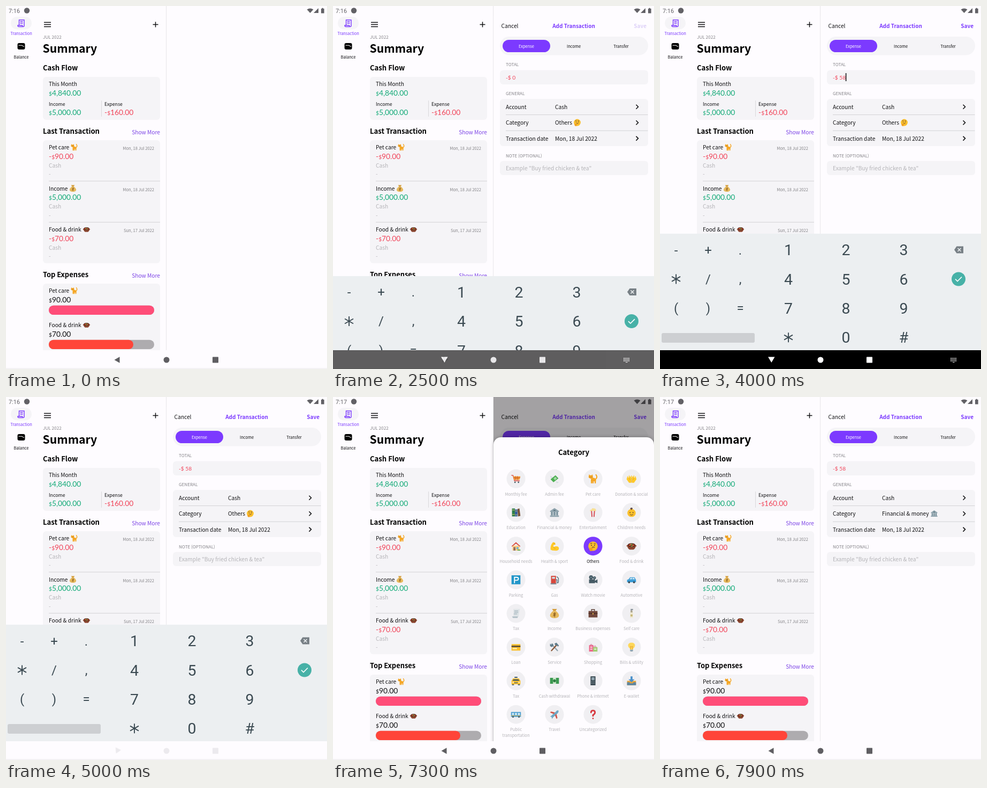
Recreate the animation shown at these times as an HTML page. Size 600 px wide and 676 px high, loop 8 s.

```html
<!DOCTYPE html>
<html lang="en">
<head>
<meta charset="utf-8">
<title>Budget app: add a transaction</title>
<style>
html, body { margin: 0; width: 100%; height: 100%; overflow: hidden; background: #fefcff; }
svg { display: block; }
#stage { width: 600px; height: 676px; }
text { font-family: "Noto Sans CJK SC", "Noto Sans CJK JP", "Noto Sans CJK", "Noto Sans", sans-serif; white-space: pre; }
.lato { font-family: Lato, sans-serif; }
.roboto { font-family: Roboto, sans-serif; }
.raised { filter: drop-shadow(0 0 3px rgba(0,0,0,.28)); }

[class^="a-"] { animation: 8s linear infinite; }
.a-panel { animation-name: panel; }
.a-keys { animation-name: keys; }
.a-dark { animation-name: dark; }
.a-light { animation-name: light; }
.a-turn { animation-name: turn; transform-origin: 208px 659px; }
.a-press { animation-name: press; }
.a-dim { animation-name: dim; }
.a-sheet { animation-name: sheet; }
.a-early, .a-late, .a-old, .a-new, .a-zero, .a-five, .a-full, .a-off, .a-on, .a-caret { animation-timing-function: step-end; }
.a-early { animation-name: early; }
.a-late { animation-name: late; }
.a-old { animation-name: old; }
.a-new { animation-name: new; }
.a-zero, .a-off { animation-name: zero; }
.a-five { animation-name: five; }
.a-full { animation-name: full; }
.a-on { animation-name: on; }
.a-caret { animation-name: caret; }

@keyframes panel {
  0%, 25.6% { transform: translateY(676px); animation-timing-function: cubic-bezier(.2,.7,.2,1); }
  29.4%, 100% { transform: none; }
}
@keyframes keys {
  0%, 29.4% { transform: translateY(252px); animation-timing-function: ease-out; }
  33.1%, 62.6% { transform: none; animation-timing-function: ease-in; }
  66%, 100% { transform: translateY(252px); }
}
@keyframes dark { 0%, 30% { opacity: 0 } 32%, 61% { opacity: 1 } 62.4%, 100% { opacity: 0 } }
@keyframes light { 0%, 30% { opacity: 1 } 32%, 62.2% { opacity: 0 } 65%, 100% { opacity: 1 } }
@keyframes turn {
  0%, 30% { transform: none }
  32%, 61.5% { transform: rotate(-90deg) }
  65%, 100% { transform: none }
}
@keyframes press { 0%, 74.8% { opacity: 0 } 75.8%, 78% { opacity: 1 } 80%, 100% { opacity: 0 } }
@keyframes dim { 0%, 77.2% { opacity: 0 } 79%, 95% { opacity: 1 } 97.5%, 100% { opacity: 0 } }
@keyframes sheet {
  0%, 77.2% { transform: translateY(612px); animation-timing-function: cubic-bezier(.2,.7,.2,1); }
  80.8%, 95% { transform: none; animation-timing-function: ease-in; }
  97.8%, 100% { transform: translateY(612px); }
}
@keyframes early { 0% { opacity: 1 } 85%, 100% { opacity: 0 } }
@keyframes late { 0% { opacity: 0 } 85%, 100% { opacity: 1 } }
@keyframes old { 0% { opacity: 1 } 93.75%, 100% { opacity: 0 } }
@keyframes new { 0% { opacity: 0 } 93.75%, 100% { opacity: 1 } }
@keyframes zero { 0% { opacity: 1 } 41.25%, 100% { opacity: 0 } }
@keyframes on { 0% { opacity: 0 } 41.25%, 100% { opacity: 1 } }
@keyframes five { 0% { opacity: 0 } 41.25% { opacity: 1 } 48.75%, 100% { opacity: 0 } }
@keyframes full { 0% { opacity: 0 } 48.75%, 100% { opacity: 1 } }
@keyframes caret {
  0% { opacity: 0 }
  32.5% { opacity: 1 }
  40% { opacity: 0 }
  41.25% { opacity: 1; transform: none }
  47.5% { opacity: 0; transform: none }
  48.75% { opacity: 1; transform: translateX(6.5px) }
  55%, 100% { opacity: 0; transform: translateX(6.5px) }
}
</style>
</head>
<body>
<svg id="stage" viewBox="0 0 600 676"></svg>
<script>
const ink = '#111113', paper = '#fefcff', card = '#f5f4f7', purple = '#7c3aff', link = '#7d45e6';
const green = '#12aa77', red = '#f1455a', gray = '#858488', pale = '#b5b4b8', key = '#3b4a52';

const text = (x, y, s, size = 10.2, fill = ink, more = '') =>
  `<text x="${x}" y="${y}" font-size="${size}" fill="${fill}" ${more}>${s}</text>`;
const bold = 'font-weight="700"', mid = 'text-anchor="middle"', end = 'text-anchor="end"';
const rect = (x, y, w, h, fill, r = 0) =>
  `<rect x="${x}" y="${y}" width="${w}" height="${h}" rx="${r}" fill="${fill}"/>`;
const line = (d, stroke, w = 1) => `<path d="${d}" fill="none" stroke="${stroke}" stroke-width="${w}"/>`;
const shape = (d, fill) => `<path d="${d}" fill="${fill}"/>`;
const disc = (x, y, r, fill) => `<circle cx="${x}" cy="${y}" r="${r}" fill="${fill}"/>`;
const anim = (name, s) => `<g class="a-${name}">${s}</g>`;
const money = (x, y, n, fill, sign = '') =>
  text(x, y, `${sign}<tspan font-size="10.2">$</tspan>${n}`, 13.8, fill, 'class="lato"');

// Pictograms on a 20 x 20 grid: "color path" is filled, "~color width path" is stroked.
const art = {
  cat: '~#f5a623 2.2 M15 11q5-4 1-9|~#f5a623 2.6 M7 12v6M10 13v5M14.5 12v6|#f5a623 M6 8h6q4 1 4 7H6zM1 7l1-6 2 2h3l2-2 1 6q-3 5-8 1z|~#5d4037 1 M4 6.5v.1M7.5 6.5v.1',
  bag: '#e6b95c M7 5h6q6 5 6 9 0 5.5-9 5.5t-9-5.5q0-4 6-9|#d39a35 M5 1h10l-3 4H8z|~#8a5c20 1.3 M12.5 10q-5-1-4 1.5t3 1.5-4 2M10.5 8v9',
  pot: '~#a4533a 3 M1.5 9.5h17|#8b4630 M2 9h16q1 5-4 8H6q-5-3-4-8|#5a2d22 M2 8.5a8 4.5 0 0 1 16 0a8 3.5 0 0 1-16 0|~#e9542f 2.2 M5.5 8h2M13 8h1.5|~#7fb04d 2 M10 6.5h1M9.5 10h.5|~#f0b45c 1.6 M8 6.3h.3M12 9.7h.3',
  think: '#fbc02d M10 .5a9.5 9.5 0 0 1 0 19a9.5 9.5 0 0 1 0-19|~#5d4037 2 M7 8v.5M13 8v.5|~#5d4037 1.1 M5 5l3-1M12 4.500l3 1M8 12.500q3-1.500 5 0|#ef9f20 M3 12l2 2 6-1 .5 1.500-3 1q1 4-2 4.500-4 0-4-4z',
  bank: '#90a4ae M1 7l9-6 9 6v2H1zM1 16h18v3H1z|#b9c6cc M3 9h14v7H3z|#78909c M3 9h3v7H3zM8.500 9h3v7h-3zM14 9h3v7h-3z|#546e7a M8 5h4v2H8z',
  cart: '~#d84b3e 1.5 M1 3h3l3 11h10|#f29b38 M4 5h15l-2 7H6z|~#c95a2f 1 M9 5v7M13 5v7M5 8h13|~#455a64 3 M8 17h.1M15 17h.1',
  cash: '#4caf50 M2 11l10-8 6 6-10 8z|#a5d6a7 M8 9l4-3 3 3-4 4z|#d5dce0 M1 4l6 3-4 2zM12 15l7 2-4 2z',
  hands: '#ffc928 M9.500 18H5L0 11l2-7 2 5 1-7 2 5 2.500-4zM10.500 18H15l5-7-2-7-2 5-1-7-2 5-2.500-4z|~#dc9a10 .8 M10 8v9M5 9l2 3M15 9l-2 3',
  books: '#2e7d4b M2 2h6v16H2z|#335c9e M8 4h5v14H8z|#76533a M13 3l4-1 2 15-5 1z|~#e8cf62 1 M3 5h4M9 7h3M3 14h4M9 15h3',
  snack: '#f7df94 M4 8q-1-4 3-4 1-4 5-2 5 0 4 6z|#eceff1 M4 7h12l-2 12H6z|#d9434a M6 7h2l1 12H7zM12 7h2l-1 12h-2z',
  child: '#fbc02d M10 3a8.500 8 0 0 1 0 16a8.500 8 0 0 1 0-16|~#543930 1.5 M10 4q-4-2 0-3 3 1 0 2|~#543930 1.8 M7 10v.5M13 10v.5|~#543930 1 M7 14q3 3 6 0',
  house: '#ffcc80 M3 9h14v10H3z|#d84b3e M1 10l9-8 9 8-1 1-8-6-8 6z|#8d6e63 M5 12h4v7H5z|#64b5d6 M11 12h4v4h-4z|#65a843 M13 17h6v2h-6z',
  arm: '#ffc928 M2 17q-1-8 5-15l4 1 1 4-4 1v4q9-4 11 2 0 6-9 5-5 0-8-2|~#dc9a10 .8 M8 12q1 3 4 3M8 5h3',
  park: '#2196c9 M1 1h18v18H1z|~#fff 2 M7 16V5h4q4 0 4 3t-4 3H7',
  fuel: '#d8473c M3 2h10v17H3z|#cfd8dc M5 4h6v4H5z|~#546e7a 1.5 M13 10h2v6q3 1 3-2V7l-3-3|#78909c M2 17h12v2H2z',
  film: '#455a64 M2 9h12v8H2zM14 12l5-3v8l-5-2zM6 1a4 4 0 0 1 0 8a4 4 0 0 1 0-8M13 3a3 3 0 0 1 0 6a3 3 0 0 1 0-6|#90a4ae M5 4h2v2H5zM12 5h2v2h-2z',
  car: '#3a9bd5 M1 10l3-1 3-4h9l3 5v5H1z|#cfe8f5 M6 9l2-3h3v3zM12 6h3l2 3h-5z|~#37474f 4 M5 15h.1M15 15h.1',
  bill: '#dfe4e7 M5 1h13l-3 16H2l3-2z|~#90a4ae 1 M7 5h7M7 8h7M6 11h6|#b0bec5 M2 16h12l-1 3H4z',
  case: '~#5d4037 1.5 M7 5V2h6v3|#70483c M1 5h18v13H1z|#503229 M1 9h18v2H1z|#e0b04c M9 9h2v3H9z',
  bottle: '#efe8d2 M7 8h6v11H7z|#b0a88d M8 4h4v4H8z|#7d8790 M8 1h5v2h-3v2H9z|#c6b778 M8 12h4v4H8z',
  credit: '#fbc02d M1 4h18v13H1z|#5d5038 M1 7h18v3H1z|#fff3d0 M3 12h9v2H3z',
  tools: '~#90a4ae 2.5 M4 4l12 13|~#8d5a3b 2.5 M4 17L14 6|#607d8b M10 3l4-2 5 6-2 2-3-3-2 1zM1 3l3 3 2-4 2 4-3 4-4-2z',
  shop: '~#c74b72 1 M4 7q2-6 5 0M12 10q2-6 4 0|#ec6b8e M2 6h9v13H2z|#a3cd75 M10 10h9v9h-9z|~#fff 1.5 M5 10h3M5 14h3M13 14h3',
  bulb: '#fdd75a M10 1q7 0 7 6 0 3-4 6v2H7v-2q-4-3-4-6 0-6 7-6|#90a4ae M7 15h6v3l-2 1H9l-2-1z|~#e99b22 1 M8 14V8l2 2 2-2v6',
  taxi: '#fbc02d M1 10l3-5h12l3 5v7H1z|#455a64 M5 7h10l2 3H3zM7 2h6v2H7zM2 17h4v2H2zM14 17h4v2h-4z|~#fff 2 M4 13h.5M16 13h.5|~#546e7a 1.5 M7 14h6',
  note: '#3b9950 M1 4h18v12H1z|#cde8c9 M7 4h6v12H7z|#2f7d43 M10 7a3 3 0 0 1 0 6a3 3 0 0 1 0-6',
  phone: '#37474f M5 1h10v18H5z|#90a4ae M7 3h6v6H7z|~#b0bec5 1.2 M7 12h.5M10 12h.5M13 12h.1M7 15h.5M10 15h.5M13 15h.1',
  inbox: '#e2a23b M1 10h18v9H1z|#4a90c9 M8 1h4v6h4l-6 6-6-6h4z|#5c86a3 M1 13h5l1 2h6l1-2h5v6H1z',
  bus: '#4c9ed1 M0 5h20v10H0z|#d9eef7 M2 7h4v4H2zM8 7h4v4H8zM14 7h4v4h-4z|~#37474f 3 M4 15h.1M16 15h.1|#e5b84c M0 12h20v1H0z',
  plane: '#6fa7c4 M18 2q-3-1-5 2L3 13l-2 1 3 1 1 4 2-3L17 7q2-3 1-5|#d15447 M11 6L3 4 1 6l7 3zM14 9l2 8-2 2-3-7z',
  ask: '~#d7373f 3 M6 6q0-4 4-4t4 4q0 3-4 5v2M10 18v.1'
};
const icon = (name, x, y, size = 13.5) =>
  `<g transform="translate(${x - size / 2} ${y - size / 2}) scale(${size / 20})" stroke-linecap="round">` +
  art[name].split('|').map(part => {
    const p = part.split(' ');
    if (part[0] !== '~') return shape(p.slice(1).join(' '), p[0]);
    return line(p.slice(2).join(' '), p[0].slice(1), p[1]);
  }).join('') + '</g>';

function rail() {
  return rect(9, 20, 39, 23.5, card, 11.7) +
    line('M24.500 36V26h9.500v10.500q0 2-2 2H24q-2 0-2-2V36h8.500v1q0 1.500 1.500 1.500M26.500 29h5M26.500 32h5', purple, 1.4) +
    text(28.5, 54, 'Transaction', 7.45, purple, mid) +
    rect(21.5, 69, 14, 12, '#000', 3) +
    line('M23.500 73.300h6.500q1.500 2.200 4 2.200', '#fff', 1.1) +
    text(28.5, 97.5, 'Balance', 7.5, ink, mid);
}

function transaction(y, name, pic, picX, date, n, fill, sign) {
  return text(80, y + 17, name) + icon(pic, picX, y + 13) +
    text(277, y + 18, date, 7.6, gray, end) + money(80, y + 34.5, n, fill, sign) +
    text(80, y + 50.5, 'Cash', 10.2, pale) + text(80, y + 66, '-', 10.2, pale);
}

function expense(y, name, pic, picX, n, fill, w) {
  return text(80, y, name) + icon(pic, picX, y - 4) + money(80, y + 17.5, n, ink) +
    rect(80, y + 23.8, 197, 17.3, '#aeacaf', 8.6) + rect(80, y + 23.8, w, 17.3, fill, 8.6);
}

function summary() {
  const more = y => text(288, y, 'Show More', 10.2, link, end);
  return line('M71 30.500h13M71 34.500h13M71 38.500h13', ink, 1.5) +
    line('M274.500 34.500h10M279.500 29.500v10', ink, 1.5) +
    text(69, 61, 'JUL 2022', 8.2, gray) + text(68.5, 87, 'Summary', 21.2, '#000', bold) +
    text(69, 120, 'Cash Flow', 13.1, '#000', bold) + rect(69, 132, 219, 80, card, 6) +
    text(80, 149, 'This Month') + money(80, 167, '4,840.00', green) +
    text(80, 186, 'Income', 8.8) + money(80, 203, '5,000.00', green) +
    line('M178.500 176v30', '#d9d8db') +
    text(184, 186, 'Expense', 8.8) + money(184, 203, '160.00', red, '-') +
    text(69, 238, 'Last Transaction', 13.1, '#000', bold) + more(239.2) +
    rect(69, 250, 219, 229, card, 6) +
    transaction(250, 'Pet care', 'cat', 127.5, 'Mon, 18 Jul 2022', '90.00', red, '-') +
    transaction(326.5, 'Income', 'bag', 125, 'Mon, 18 Jul 2022', '5,000.00', green) +
    transaction(403, 'Food &amp; drink', 'pot', 150.5, 'Sun, 17 Jul 2022', '70.00', red, '-') +
    line('M80 326h208M80 402.700h208', '#d3d2d5') +
    text(69, 505.2, 'Top Expenses', 12.9, '#000', bold) + more(506.4) +
    rect(69, 517, 219, 140, card, 6) +
    expense(534, 'Pet care', 'cat', 127.5, '90.00', '#ff4d78', 197) +
    expense(598, 'Food &amp; drink', 'pot', 150.5, '70.00', '#ff4539', 158);
}

function status() {
  const dark = '#626166', clock = s => text(5, 12.5, s, 10.9, dark, 'class="roboto"');
  return anim('early', clock('7:16')) + anim('late', clock('7:17')) + disc(39, 8.5, 5.2, dark) +
    shape('M562.500 6.500q6-4 12 0l-6 6.500z', dark) + shape('M575 13h9V4z', dark) +
    shape('M589 5h1.500V3.800h2.500V5h1.700v8.500H589z', dark);
}

function form() {
  const row = (y, name) => text(323, y, name) + line(`M566.500 ${y - 8}l4 4-4 4`, ink, 1.6);
  const head = (y, s) => text(323, y, s, 8.1, gray);
  const value = s => text(323, 136.5, `-$ ${s}`, 10.2, red, 'class="lato"');
  const save = fill => text(586, 41, 'Save', 10, fill, bold + ' ' + end);
  return rect(300.5, 18, 300, 660, paper) +
    text(314.5, 41, 'Cancel') + text(450, 41, 'Add Transaction', 10, purple, bold + ' ' + mid) +
    anim('off', save('#ddd0f8')) + anim('on', save(purple)) +
    rect(312, 57, 277, 34.5, card, 17.2) + rect(317, 63, 89, 23, purple, 11.5) +
    text(361.5, 77.5, 'Expense', 7.5, '#fff', mid) + text(450, 77.5, 'Income', 7.5, ink, mid) +
    text(538.5, 77.5, 'Transfer', 7.5, ink, mid) +
    head(112, 'TOTAL') + rect(312, 119.5, 277, 26.5, card, 6) +
    anim('zero', value('0')) + anim('five', value('5')) + anim('full', value('58')) +
    anim('caret', rect(340.4, 125, 1.6, 15, ink)) +
    head(166, 'GENERAL') + rect(312, 173, 277, 88, card, 6) +
    anim('press', rect(312, 203, 277, 29, '#d2d0d3')) +
    line('M323 202.500h265.500M323 232.200h265.500', '#d3d2d5') +
    row(191.8, 'Account') + text(415, 191.8, 'Cash') + row(221.2, 'Category') +
    anim('old', text(415, 221.2, 'Others') + icon('think', 456.5, 217)) +
    anim('new', text(415, 221.2, 'Financial &amp; money') + icon('bank', 512.5, 217)) +
    row(250.6, 'Transaction date') + text(415, 250.6, 'Mon, 18 Jul 2022') +
    head(281.8, 'NOTE (OPTIONAL)') + rect(312, 288.5, 277, 26.5, card, 6) +
    text(323, 305.6, 'Example "Buy fried chicken &amp; tea"', 10.2, pale);
}

const categories = `cart:Monthly fee,cash:Admin fee,cat:Pet care,hands:Donation & social,books:Education,
bank:Financial & money,snack:Entertainment,child:Children needs,house:Household needs,arm:Health & sport,
think:Others,pot:Food & drink,park:Parking,fuel:Gas,film:Watch movie,car:Automotive,bill:Tax,bag:Income,
case:Business expenses,bottle:Self care,credit:Loan,tools:Service,shop:Shopping,bulb:Bills & utility,
taxi:Tax,note:Cash withdrawal,phone:Phone & internet,inbox:E-wallet,bus:Public/transportation,
plane:Travel,ask:Uncategorized`.split(',').map(s => s.trim().replace('&', '&amp;').split(':'));

function sheet() {
  const cells = categories.map(([pic, name], i) => {
    const x = 342 + 72 * (i % 4), y = 152.3 + 62.7 * Math.floor(i / 4);
    const label = fill => name.split('/').map((s, k) => text(x, y + 31.2 + 11 * k, s, 7.55, fill, mid)).join('');
    const idle = disc(x, y, 17.5, '#f0eff2') + label(pale);
    const chosen = disc(x, y, 17.5, purple) + label(ink);
    const swap = { think: ['old', 'new'], bank: ['new', 'old'] }[pic];
    return (swap ? anim(swap[0], chosen) + anim(swap[1], idle) : idle) + icon(pic, x, y, 18.5);
  });
  return `<g class="raised">${rect(300, 75, 300, 640, paper, 14)}</g>` +
    text(450, 107.5, 'Category', 13.1, '#000', bold + ' ' + mid) + cells.join('');
}

function keyboard() {
  const star = (x, y) => line(`M${x} ${y - 9}v18M${x - 8} ${y - 4.5}l16 9M${x - 8} ${y + 4.5}l16-9`, key, 1.9);
  const rows = ['-+.123', '*/,456', '()=789', '   *0#'];
  const cols = [30, 90, 150, 240, 347.5, 455.5];
  const caps = rows.map((row, r) => [...row].map((c, i) => {
    const y = 454 + 54.4 * r;
    if (c === ' ') return '';
    return c === '*' ? star(cols[i], y) :
      text(cols[i], y + (i < 3 ? 8.5 : 10.2), c, i < 3 ? 24 : 28.5, key, mid + ' class="roboto"');
  }).join('')).join('');
  return rect(0, 424, 600, 252, '#eceff1') + caps + rect(3, 609, 174, 18, '#cdcfd2', 3) +
    shape('M550 454l4.500-6.500H567v13h-12.500z', '#788086') + line('M556.500 451l6 6M562.500 451l-6 6', '#eceff1', 1.6) +
    disc(558, 508.5, 13, '#47b1a7') + line('M552 508.500l4 4 8-8', '#fff', 1.7);
}

function navBar() {
  const gray = '#5f5e62';
  const dots = [0, 1, 2].map(r => line(`M543 ${656 + 2.5 * r}h11`, '#fff', 1.4)).join('');
  return rect(0, 641, 600, 35, paper) + line('M0 675h600', '#e9e8ea') +
    anim('light', anim('turn', shape('M202.500 659l10-5.700v11.400z', gray)) +
      disc(300, 659, 5.5, gray) + rect(386, 653.5, 11, 11, gray, .8)) +
    anim('dark', rect(0, 641, 600, 35, '#000') + shape('M202 653.500h12.500l-6.200 10.500z', '#fff') +
      disc(300, 659, 5.5, '#fff') + rect(386, 653.5, 11, 11, '#fff', .8) +
      `<g stroke-dasharray="1.4 1">${dots}</g>` + line('M547 663.500h3.500', '#fff', 1));
}

document.getElementById('stage').innerHTML =
  rect(0, 0, 600, 676, paper) + rail() + summary() + line('M299.700 0v641', '#e6e4e8') +
  anim('panel', form()) + status() +
  anim('dim', rect(300, 0, 300, 676, 'rgba(0,0,0,.36)')) +
  anim('sheet', sheet()) + anim('keys', keyboard()) + navBar();
</script>
</body>
</html>
```
